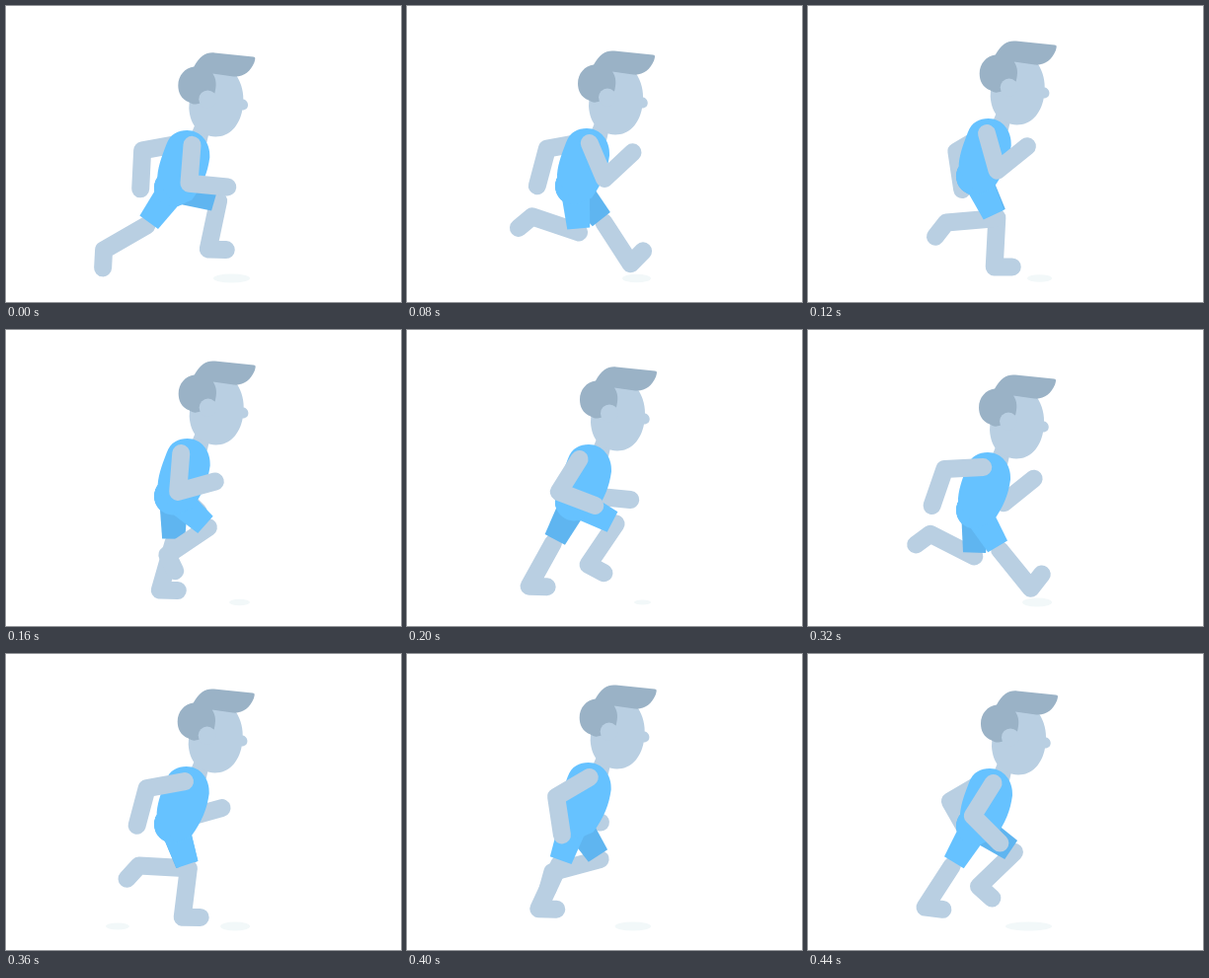
These frames come from a looping animation (400x300 px, 480 ms). An HTML page with a canvas:

```html
<!DOCTYPE html>
<html lang="en">
<head>
<meta charset="utf-8">
<title>Runner</title>
<style>
  html, body { margin: 0; width: 100%; height: 100%; overflow: hidden; background: #fff; }
  canvas { display: block; width: 400px; height: 300px; }
</style>
</head>
<body>
<canvas id="stage" width="400" height="300"></canvas>
<script>
const ctx = document.getElementById('stage').getContext('2d');
const SKIN = '#b9cfe2', HAIR = '#9ab2c6', SHIRT = '#66c2ff', SHADE = '#5fb5f0', DUST = '#f2f8f9';
const STEPS = 12, STEP_MS = 40;
const THIGH = 47, SHIN = 50, FOOT = 18, ARM = 39;
// The far limbs run about half a cycle apart from the near ones
const FAR_LEG = 5.5, FAR_ARM = 7;

// Stride: step, then thigh, shin and foot angles in degrees, 0 down, 90 forward
const STRIDE = [
  [0, -36, -60, -3],
  [1.5, -2, -117, -54],
  [3, 25, -85, -38],
  [4.5, 56, -46, 48],
  [6, 80, 0, 102],
  [8, 31, 39, 142],
  [8.5, 27, -3, 90],
  [10.5, -28, -29, 88],
  [11, -31, -33, 83],
  [11.5, -32, -63, -20]
];

const rad = deg => deg * Math.PI / 180;
const wave = (step, period = STEPS) => Math.cos(2 * Math.PI * step / period);

function legAngles(step) {
  step %= STEPS;
  const n = STRIDE.findLastIndex(key => key[0] <= step);
  const from = STRIDE[n], to = STRIDE[(n + 1) % STRIDE.length];
  const t = (step - from[0]) / ((to[0] || STEPS) - from[0]);
  const ease = t * t * (3 - 2 * t);
  return from.slice(1).map((a, k) => a + (to[k + 1] - a) * ease);
}

const armAngles = step => [-32 + 55 * wave(step - 2), 57 + 77 * wave(step - 2.3)];

// Joint positions along a chain of bones
function chain(x, y, angles, lengths) {
  const joints = [[x, y]];
  angles.forEach((a, k) => {
    x += lengths[k] * Math.sin(rad(a));
    y += lengths[k] * Math.cos(rad(a));
    joints.push([x, y]);
  });
  return joints;
}

const torso = new Path2D('M153 172C154 160 159 148 162 140C166 129 174 125.5 183 125.5' +
  'C197 125.5 207 138 206 153C204 168 199 181 188 196L172 203L153 178Z');
const neck = new Path2D('M189 112L191 120L186 132L203 138L205 129L214 126Z');
const face = new Path2D('M186 85L200 62L231 67C237 75 240 84 240 94C246 95 247 105 239 105' +
  'C236 121 226 132 212 132C196 131 186 121 185 103Z');
const hair = new Path2D('M190 61C196 50 203 46 211 47L250 51C253 51 252 54 251 57' +
  'C247 66 240 72 230 71L209 68C213 74 213 80 211 88L196 98C191 100 188 99 185 97' +
  'C177 94 174 87 174 80C174 70 181 62 190 61Z');

function fill(color, path) {
  ctx.fillStyle = color;
  ctx.fill(path);
}

function oval(color, x, y, rx, ry = rx) {
  ctx.fillStyle = color;
  ctx.beginPath();
  ctx.ellipse(x, y, rx, ry, 0, 0, 2 * Math.PI);
  ctx.fill();
}

function drawLimb(joints) {
  ctx.beginPath();
  for (const [x, y] of joints) ctx.lineTo(x, y);
  ctx.strokeStyle = SKIN;
  ctx.lineWidth = 18;
  ctx.lineCap = ctx.lineJoin = 'round';
  ctx.stroke();
}

function drawArm(step, x, y) {
  drawLimb(chain(x, y, armAngles(step), [ARM, ARM]));
}

function drawLeg(step, color, x, y) {
  const angles = legAngles(step), hem = THIGH - 4;
  drawLimb(chain(x, y, angles, [THIGH, SHIN, FOOT]).slice(1));
  ctx.save();
  ctx.translate(x, y);
  ctx.rotate(-rad(angles[0]));
  fill(color, new Path2D(`M-15 0L-11.5 ${hem}H11.5L15 0Z`));
  ctx.restore();
  oval(color, x - 1, y, 19);
}

function drawDust(i) {
  const left = i < 6 ? 210 + 4 * i : 200 + 18 * Math.sin(Math.PI * (i - 6) / 5);
  const rx = (247 - left) / 2;
  oval(DUST, 247 - rx, 276, rx, Math.min(4.5, rx * .3));
  if (i === 9) oval(DUST, 113, 276, 12, 3.5);
}

function draw(i) {
  const x = -Math.sin(rad(60 * i - 18));
  const y = -5.5 + 10 * wave(i - .9, STEPS / 2);
  const twist = 7.5 * wave(i);
  ctx.clearRect(0, 0, 400, 300);
  drawDust(i);

  drawArm(i + FAR_ARM, 184 - twist, 139 + y);
  drawLeg(i + FAR_LEG, SHADE, 170, 184 + y);
  drawLeg(i, SHIRT, 170, 184 + y);

  ctx.save();
  ctx.translate(x, y);
  fill(SKIN, neck);
  fill(SHIRT, torso);
  fill(SKIN, face);
  fill(HAIR, hair);
  oval(SKIN, 204, 94, 9);
  ctx.restore();

  drawArm(i, 181 + twist, 140.5 + y);
}

const start = performance.now();
function tick() {
  draw(Math.floor((performance.now() - start) / STEP_MS) % STEPS);
  requestAnimationFrame(tick);
}
tick();
</script>
</body>
</html>
```
